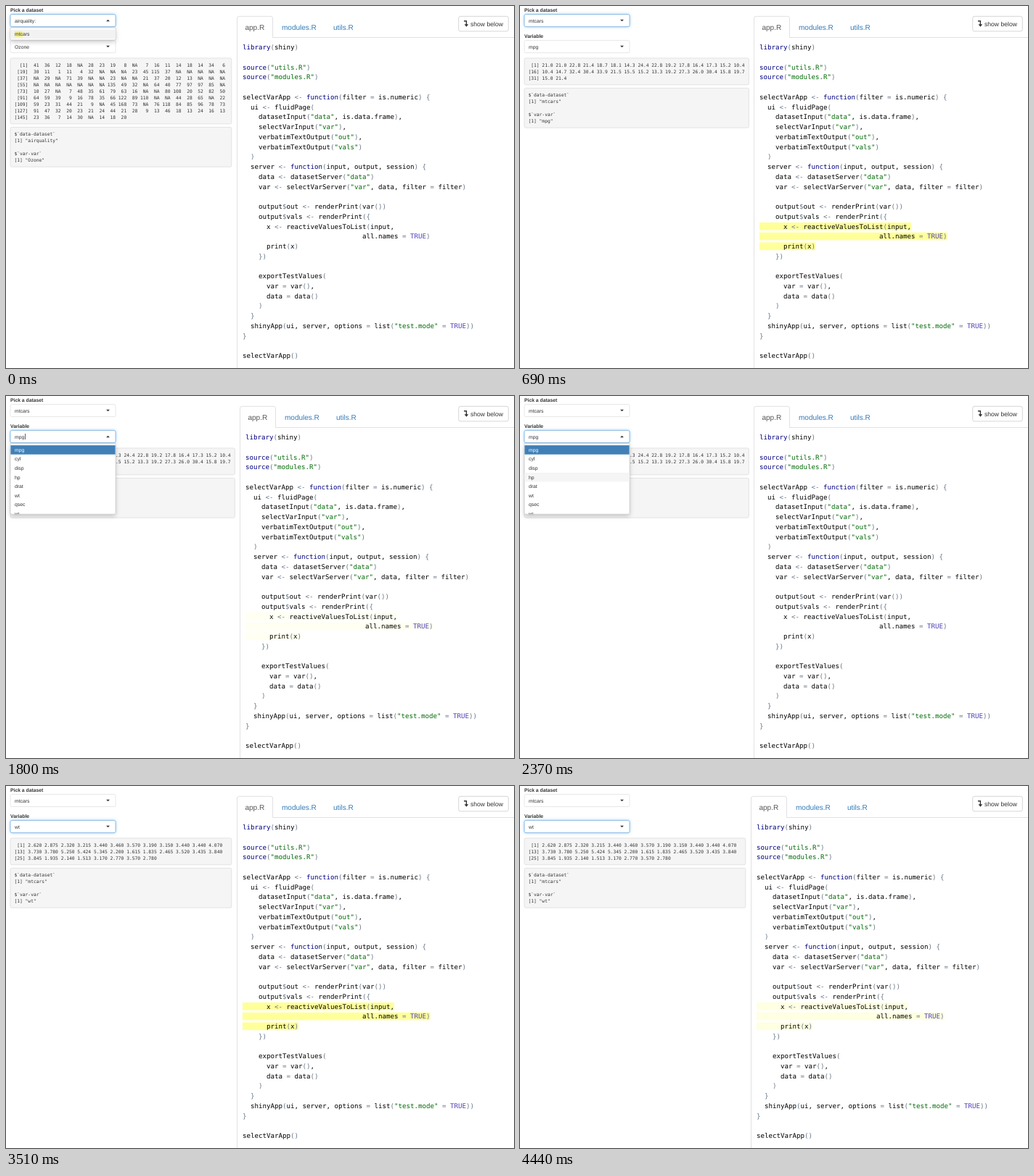
Animation of 700 by 500 pixels, one loop 4470 ms. Source, as an HTML page with a canvas:

```html
<!DOCTYPE html>
<html lang="en">
<head>
<meta charset="utf-8">
<title>Shiny showcase</title>
<style>
  html, body { margin: 0; width: 100%; height: 100%; overflow: hidden; background: #fff; }
  canvas { display: block; width: 700px; height: 500px; }
</style>
</head>
<body>
<canvas id="stage"></canvas>
<script>
const LOOP = 4470;
const MONO = '"DejaVu Sans Mono", monospace';
const SANS = '"Liberation Sans", Arial, sans-serif';

// Times of the user's actions and of the app's replies, in ms
const PICK_DATA = 540, DATA_READY = 630, OPEN_VAR = 1620, PICK_VAR = 3240, VAR_READY = 3510;
const FLASHES = [570, 3420], FLASH_MS = 1600;
const TYPING = [[0, 'mtc'], [240, 'mtca'], [300, 'mtcar'], [360, 'mtcars']];
const HOVERS = [[0, 0], [2190, 1], [2280, 2], [2370, 3], [2790, 4], [2970, 5]];
const OPTIONS = ['mpg', 'cyl', 'disp', 'hp', 'drat', 'wt', 'qsec', 'vs'];

const CODE = `library(shiny)

source("utils.R")
source("modules.R")

selectVarApp <- function(filter = is.numeric) {
  ui <- fluidPage(
    datasetInput("data", is.data.frame),
    selectVarInput("var"),
    verbatimTextOutput("out"),
    verbatimTextOutput("vals")
  )
  server <- function(input, output, session) {
    data <- datasetServer("data")
    var <- selectVarServer("var", data, filter = filter)

    output$out <- renderPrint(var())
    output$vals <- renderPrint({
      x <- reactiveValuesToList(input,
                              all.names = TRUE)
      print(x)
    })

    exportTestValues(
      var = var(),
      data = data()
    )
  }
  shinyApp(ui, server, options = list("test.mode" = TRUE))
}

selectVarApp()`.split('\n');
const FLASH_LINES = [18, 19, 20];
const TOKEN = /("[^"]*")|((?:library|source|function)(?=\())|(TRUE)|(<-|[=$(){}])|[\w.,]+|\s+/g;
const TOKEN_COLORS = ['#036a07', '#00007f', '#5040b8', '#687687'];

const OZONE = `41 36 12 18 NA 28 23 19 8 NA 7 16 11 14 18 14 34 6
30 11 1 11 4 32 NA NA NA 23 45 115 37 NA NA NA NA NA
NA 29 NA 71 39 NA NA 23 NA NA 21 37 20 12 13 NA NA NA
NA NA NA NA NA NA NA 135 49 32 NA 64 40 77 97 97 85 NA
10 27 NA 7 48 35 61 79 63 16 NA NA 80 108 20 52 82 50
64 59 39 9 16 78 35 66 122 89 110 NA NA 44 28 65 NA 22
59 23 31 44 21 9 NA 45 168 73 NA 76 118 84 85 96 78 73
91 47 32 20 23 21 24 44 21 28 9 13 46 18 13 24 16 13
23 36 7 14 30 NA 14 18 20`;
const MPG = `21.0 21.0 22.8 21.4 18.7 18.1 14.3 24.4 22.8 19.2 17.8 16.4 17.3 15.2 10.4
10.4 14.7 32.4 30.4 33.9 21.5 15.5 15.2 13.3 19.2 27.3 26.0 30.4 15.8 19.7
15.0 21.4`;
const WT = `2.620 2.875 2.320 3.215 3.440 3.460 3.570 3.190 3.150 3.440 3.440 4.070
3.730 3.780 5.250 5.424 5.345 2.200 1.615 1.835 2.465 3.520 3.435 3.840
3.845 1.935 2.140 1.513 3.170 2.770 3.570 2.780`;

// Lays a vector out the way R prints it
function printVector(text, labelWidth, width) {
  let index = 1;
  return text.split('\n').map(row => {
    const cells = row.split(' ');
    const label = `[${index}]`.padStart(labelWidth);
    index += cells.length;
    return label + cells.map(c => ' ' + c.padStart(width)).join('');
  });
}

const printInputs = (data, name) =>
  ['$`data-dataset`', `[1] "${data}"`, '', '$`var-var`', `[1] "${name}"`];

const RESULTS = {
  Ozone: [printVector(OZONE, 5, 3), printInputs('airquality', 'Ozone')],
  mpg: [printVector(MPG, 4, 4), printInputs('mtcars', 'mpg')],
  wt: [printVector(WT, 4, 5), printInputs('mtcars', 'wt')]
};

const canvas = document.getElementById('stage');
const ctx = canvas.getContext('2d');
const ratio = window.devicePixelRatio || 1;
canvas.width = 700 * ratio;
canvas.height = 500 * ratio;
ctx.scale(ratio, ratio);
ctx.textRendering = 'geometricPrecision';

function text(str, x, y, font, color = '#333') {
  ctx.font = font;
  ctx.fillStyle = color;
  ctx.fillText(str, x, y);
}

function rect(x, y, w, h, color) {
  ctx.fillStyle = color;
  ctx.fillRect(x, y, w, h);
}

function box(x, y, w, h, radius, fill, border) {
  ctx.beginPath();
  ctx.roundRect(x, y, w, h, radius);
  ctx.fillStyle = fill;
  ctx.fill();
  ctx.shadowColor = 'transparent';
  ctx.lineWidth = 0.7;
  ctx.strokeStyle = border;
  ctx.stroke();
}

function glow(color, blur, dy = 0) {
  ctx.shadowColor = color;
  ctx.shadowBlur = blur * ratio;
  ctx.shadowOffsetY = dy * ratio;
}

function lines(points) {
  ctx.beginPath();
  points.forEach(([x, y]) => ctx.lineTo(x, y));
}

const latest = (steps, t) => steps.filter(([at]) => at <= t).pop()[1];

const UI = `6.8px ${SANS}`, LABEL = `bold 6.8px ${SANS}`;

function select(y, value, focused, open) {
  if (focused) glow('rgba(102,175,233,.7)', 4);
  box(6, y, 145, 17, 2, '#fff', focused ? '#66a5dc' : '#ddd');
  text(value, 12, y + 11, UI);
  const tip = open ? -1.3 : 1.3;
  lines([[138.1, y + 8.4 - tip], [142.9, y + 8.4 - tip], [140.5, y + 8.4 + tip]]);
  ctx.fillStyle = '#333';
  ctx.fill();
}

function dropdown(y, h, drawRows) {
  glow('rgba(0,0,0,.22)', 6, 2.5);
  box(6, y, 145, h, [0, 0, 2, 2], '#fff', '#ccc');
  ctx.save();
  ctx.beginPath();
  ctx.rect(6, y, 145, h);
  ctx.clip();
  drawRows(y + 2.6);
  ctx.restore();
}

function dataMenu(t) {
  dropdown(30, 17, y => {
    const typed = latest(TYPING, t);
    rect(6.4, y, 144.2, 12.6, '#f2f2f2');
    ctx.font = UI;
    rect(12, y + 2, ctx.measureText(typed).width, 8.2, '#f3f08c');
    text('mtcars', 12, y + 8.5, UI);
  });
}

function varMenu(t) {
  const active = latest(HOVERS, t);
  dropdown(65.5, 97.7, top => {
    OPTIONS.forEach((name, i) => {
      const y = top + i * 12.6;
      if (!i) rect(6.4, y, 144.2, 12.6, '#4080b7');
      else if (i === active) rect(6.4, y, 144.2, 12.6, '#f5f5f5');
      text(name, 12, y + 8.7, UI, i ? '#333' : '#fff');
    });
  });
}

function output(y, w, rows) {
  const h = rows.length * 9 + 9.8;
  box(6, y, w, h, 2, '#f5f5f5', '#d8d8d8');
  rows.forEach((row, i) => text(row, 11.5, y + 12 + i * 9, `6.287px ${MONO}`));
  return y + h + 4.6;
}

function inputs(t, width) {
  const variable = t < DATA_READY ? 'Ozone' : t < VAR_READY ? 'mpg' : 'wt';
  const dataOpen = t < PICK_DATA;
  const varOpen = t >= OPEN_VAR && t < PICK_VAR;
  const shown = t >= PICK_VAR ? 'wt' : variable;

  const [values, list] = RESULTS[variable];
  output(output(72, width, values), width, list);

  text('Pick a dataset', 6, 7.5, LABEL);
  text('Variable', 6, 43.5, LABEL);
  select(11.6, dataOpen ? 'airquality:' : 'mtcars', t < OPEN_VAR, dataOpen);
  select(47.6, shown, t >= OPEN_VAR, varOpen);
  if (dataOpen) dataMenu(t);
  if (varOpen) {
    varMenu(t);
    if ((t - OPEN_VAR) % 960 < 480) rect(26.3, 52, 0.7, 8, '#222');
  }
}

function flashColor(t) {
  const start = FLASHES.filter(at => at <= t).pop();
  const p = (t - start) / FLASH_MS;
  if (!(p < 1)) return null;
  const eased = 0.5 - Math.cos(p * Math.PI) / 2;
  return `rgb(255,255,${Math.round(153 + 102 * eased)})`;
}

function code(x, t) {
  const advance = 5.5, lead = 13.74, first = 60.2;
  const font = `9.136px ${MONO}`;
  const flash = flashColor(t);
  CODE.forEach((line, row) => {
    const y = first + row * lead;
    if (flash && FLASH_LINES.includes(row)) {
      rect(x, y - 8.5, line.length * advance, 10.7, flash);
    }
    for (const m of line.matchAll(TOKEN)) {
      const kind = m.slice(1).findIndex(Boolean);
      text(m[0], x + m.index * advance, y, font, TOKEN_COLORS[kind] || '#000');
    }
  });
}

function tabs(x) {
  const left = x - 7.5, right = left + 49, font = `10px ${SANS}`;
  ctx.lineWidth = 0.7;
  ctx.strokeStyle = '#d4d4d4';
  ctx.beginPath();
  ctx.moveTo(left, 500);
  ctx.lineTo(left, 17);
  ctx.arcTo(left, 14.3, left + 3, 14.3, 2.7);
  ctx.arcTo(right, 14.3, right, 17, 2.7);
  ctx.lineTo(right, 43.5);
  ctx.lineTo(700, 43.5);
  ctx.stroke();
  text('app.R', x + 3.5, 32.6, font, '#555');
  text('modules.R', x + 54, 32.6, font, '#337ab7');
  text('utils.R', x + 125, 32.6, font, '#337ab7');
}

function button() {
  box(623.7, 14.3, 68.6, 20.6, 2.5, '#fff', '#c4c4c4');
  text('show below', 640, 27.8, `8.6px ${SANS}`);
  ctx.lineWidth = 1.4;
  ctx.strokeStyle = '#333';
  lines([[631, 20.7], [634.4, 20.7], [634.4, 26]]);
  ctx.stroke();
  lines([[631.6, 25.3], [637.2, 25.3], [634.4, 28.8]]);
  ctx.fillStyle = '#333';
  ctx.fill();
}

function draw(t) {
  const wide = t >= DATA_READY && t < VAR_READY;
  const x = wide ? 330 : 326;
  rect(0, 0, 700, 500, '#fff');
  inputs(t, wide ? 309.4 : 304.8);
  tabs(x);
  button();
  code(x, t);
}

const begin = performance.now();
function tick() {
  draw((performance.now() - begin) % LOOP);
  requestAnimationFrame(tick);
}
tick();
</script>
</body>
</html>
```
